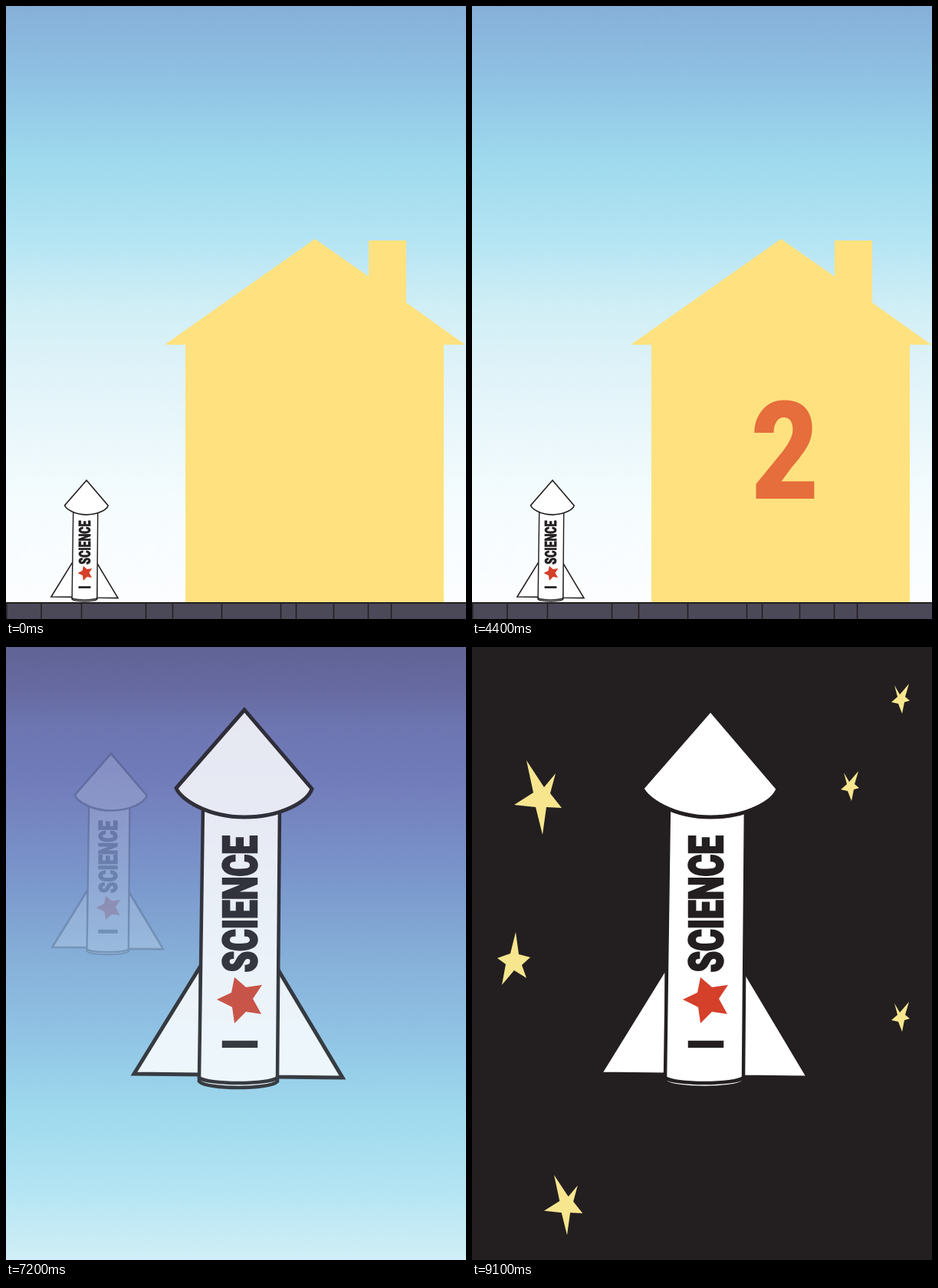
Write an HTML page that moves like this. It is 600x800 px and loops after 9200 ms.

```html
<!DOCTYPE html>
<html lang="en">
<head>
<meta charset="utf-8">
<title>Rocket countdown</title>
<style>
  html, body { margin: 0; width: 100%; height: 100%; overflow: hidden; background: #231f20; }
  svg { display: block; width: 100vw; height: 100vh; }
  text { font-family: Roboto, "Open Sans", sans-serif; font-weight: 900; }

  /* Every moving part shares one 9.2 s loop, advanced in 100 ms steps. */
  .move { animation: 9.2s steps(6) infinite; }
  .sky { animation-name: sky; }
  .house { animation-name: house; }
  .lift { animation-name: lift; }
  .smoke { animation-name: smoke; transform-origin: 105px 780px; }
  .mid { animation-name: mid; }
  .big { animation-name: big; }
  .trail { animation-name: trail; }
  .digit { animation-name: pop; animation-delay: calc(var(--n) * 1.2s); opacity: 0; }
  .digit text { font-size: 178px; text-anchor: middle; fill: #da341b; }

  @keyframes pop {
    0% { opacity: 0; }
    6.52% { opacity: 1; }
    13.04%, 100% { opacity: 0; }
  }
  @keyframes sky {
    0%, 66.3% { transform: translateY(0); }
    72.82% { transform: translateY(205px); }
    79.34% { transform: translateY(445px); }
    85.86% { transform: translateY(785px); animation-timing-function: steps(12); }
    98.91%, 100% { transform: translateY(1585px); }
  }
  @keyframes house {
    0%, 66.3% { transform: translateY(0); }
    72.82% { transform: translateY(120px); }
    79.34%, 100% { transform: translateY(660px); }
  }
  @keyframes lift {
    0%, 58.69% { transform: translateY(0); opacity: 1; }
    65.21% { transform: translateY(-30px); opacity: 1; animation-timing-function: steps(7); }
    72.82%, 100% { transform: translateY(-150px); opacity: 0; }
  }
  @keyframes smoke {
    0% { fill-opacity: 0; transform: scale(1); }
    58.69% { fill-opacity: 0; transform: scale(1); animation-timing-function: steps(2); }
    60.86% { fill-opacity: .38; transform: scale(1); animation-timing-function: steps(5); }
    66.3% { fill-opacity: .38; transform: scale(1.3); }
    72.82%, 100% { fill-opacity: 0; transform: scale(1.3); }
  }
  @keyframes mid {
    0%, 66.3% { opacity: 0; }
    72.82% { opacity: 1; }
    79.34%, 100% { opacity: 0; }
  }
  @keyframes big {
    0%, 72.82% { opacity: 0; }
    79.34%, 100% { opacity: 1; }
  }
  @keyframes trail {
    0%, 79.34% { opacity: 0; }
    85.86%, 100% { opacity: 1; }
  }
</style>
</head>
<body>
<svg viewBox="0 0 600 800" preserveAspectRatio="none">
  <defs>
    <linearGradient id="air" gradientUnits="userSpaceOnUse" x1="0" y1="-735" x2="0" y2="800">
      <stop offset="0" stop-color="#231f20"/>
      <stop offset=".033" stop-color="#2b282a"/>
      <stop offset=".065" stop-color="#383639"/>
      <stop offset=".098" stop-color="#434148"/>
      <stop offset=".13" stop-color="#4b4958"/>
      <stop offset=".163" stop-color="#55547b"/>
      <stop offset=".208" stop-color="#5f6293"/>
      <stop offset=".251" stop-color="#666aa0"/>
      <stop offset=".283" stop-color="#6d76b1"/>
      <stop offset=".316" stop-color="#6f7ab8"/>
      <stop offset=".349" stop-color="#7482be"/>
      <stop offset=".41" stop-color="#7a96cb"/>
      <stop offset=".479" stop-color="#86afd8"/>
      <stop offset=".537" stop-color="#8fc1e3"/>
      <stop offset=".609" stop-color="#9ed9ed"/>
      <stop offset=".674" stop-color="#b3e4f3"/>
      <stop offset=".739" stop-color="#d2eff6"/>
      <stop offset=".792" stop-color="#e0f3f9"/>
      <stop offset=".902" stop-color="#f5fcfe"/>
      <stop offset="1" stop-color="#fdfdff"/>
    </linearGradient>

    <g id="rocket">
      <g fill="#fff" stroke="#231f20" stroke-width="5">
        <path d="M254 416 L167 557 L254 558Z"/>
        <path d="M353 418 L439 562 L353 561Z"/>
        <path stroke-width="4.5" d="M252 560V567C262 577.7 344 577.7 354 567V560"/>
        <path stroke-width="4.5" d="M257 205L252 562C262 571.4 344 571.4 354 562L357 205Z"/>
        <path d="M311 82L222 184C227 198 262 222 311 222S394 201 399 185Z"/>
      </g>
      <g fill="#231f20" stroke="#231f20" stroke-width="2.5" font-size="61">
        <text transform="translate(327 525) rotate(-90) scale(.72 1)">I</text>
        <text transform="translate(327 424.5) rotate(-90) scale(.72 1)">SCIENCE</text>
      </g>
      <polygon fill="#d4402a" points="298,431 313,444 334,441 322,459 333,479 313,476 298,491 295,470 275,460 294,451"/>
    </g>

    <polygon id="star" points="71,148 94,183 109,165 102,191 117,210 97,209 92,245 83,209 55,206 80,190"/>
    <polygon id="spark" points="551,50 558,62 570,48 565,65 571,70 564,72 561,87 556,74 547,72 555,65"/>
  </defs>

  <g class="move sky">
    <rect y="-1600" width="600" height="2400" fill="url(#air)"/>
    <g fill="#f8e68f" transform="translate(0 -1585)">
      <use href="#star"/>
      <use href="#star" transform="translate(49.5 569) scale(.81)"/>
      <polygon points="57,372 61,401 76,405 65,415 71,432 55,422 39,441 44,414 33,406 50,400"/>
      <use href="#spark"/>
      <use href="#spark" x="-66" y="114"/>
      <use href="#spark" y="415"/>
    </g>
  </g>

  <g class="move house">
    <polygon fill="#ffe27f" points="207,442 403,304 473,353 473,306 522,306 522,387 599,442 571,442 571,778 234,778 234,442"/>
    <rect y="778" width="600" height="22" fill="#4b4958"/>
    <g fill="none" stroke="#231f20">
      <path stroke-width="2" d="M0 779H600"/>
      <path stroke-width="1.5" d="M1 779V800M46 779V800M98.5 779V800M182.5 779V800M217.5 779V800M281.5 779V800M358.5 779V800M378.5 779V800M427.5 779V800M472.5 779V800M502.5 779V800"/>
    </g>
  </g>

  <g class="move digit" style="--n:0"><text transform="translate(409 642) scale(.86 1)">5</text></g>
  <g class="move digit" style="--n:1"><text transform="translate(406 643) scale(.86 1)">4</text></g>
  <g class="move digit" style="--n:2"><text transform="translate(409 642) scale(.86 1)">3</text></g>
  <g class="move digit" style="--n:3"><text transform="translate(408 643) scale(.86 1)">2</text></g>
  <g class="move digit" style="--n:4"><text transform="translate(409 643) scale(.86 1)">1</text></g>

  <g class="move lift"><use href="#rocket" transform="translate(5.5 592.8) scale(.32)"/></g>
  <g class="move smoke" fill="#231f20" fill-opacity="0">
    <ellipse cx="62" cy="766" rx="40" ry="29"/>
    <ellipse cx="106" cy="781" rx="24" ry="18"/>
    <ellipse cx="148" cy="775" rx="16" ry="19"/>
    <ellipse cx="182" cy="752" rx="23" ry="28"/>
  </g>

  <g class="move mid"><use href="#rocket" transform="translate(-28.5 95.4) scale(.532)"/></g>
  <path class="move trail" stroke="#231f20" stroke-width="5" d="M247.5 608V730M299.5 626V762M335.5 651V735"/>
  <g class="move big"><use href="#rocket"/></g>
</svg>
</body>
</html>
```
